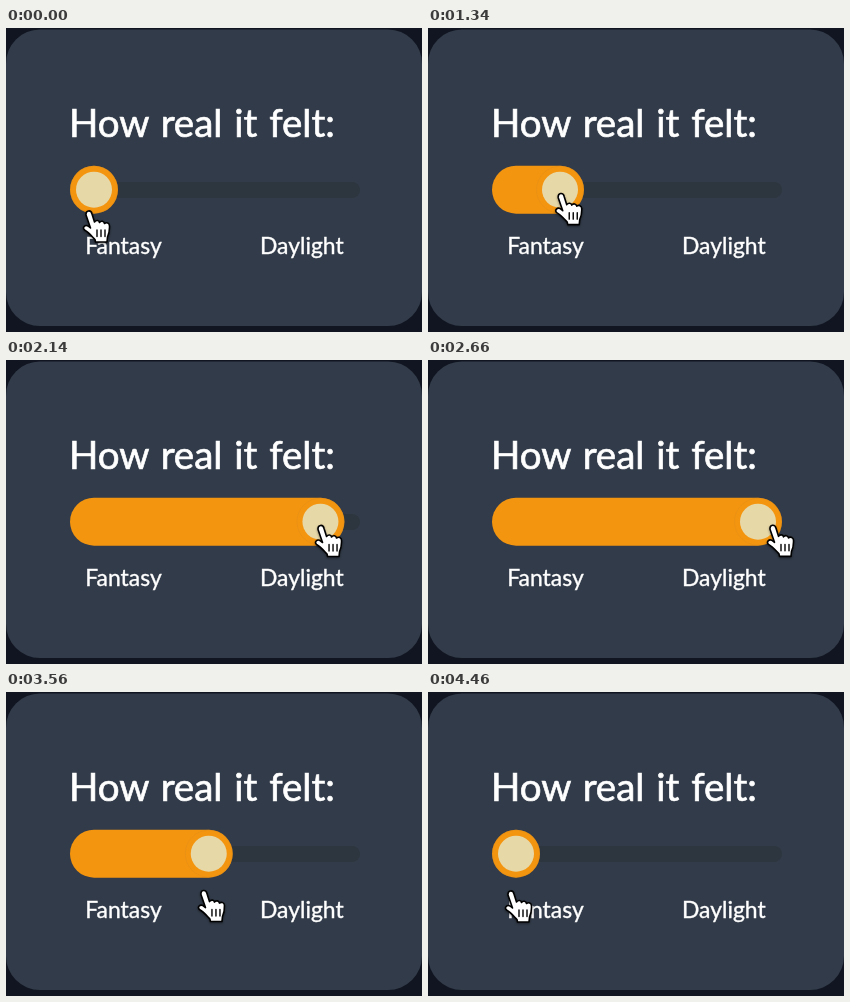
Write an HTML page that moves like this. It is 416x304 px and loops after 4480 ms.

```html
<!DOCTYPE html>
<html lang="en">
<head>
<meta charset="utf-8">
<title>Slider</title>
<style>
  html, body { margin: 0; width: 100%; height: 100%; overflow: hidden; background: #111521; }
  svg { display: block; width: 416px; height: 304px; }
  text { font-family: Lato, "Open Sans", sans-serif; fill: #fff; stroke: #fff; stroke-width: .4px; }
  .title { font-size: 38.5px; word-spacing: 2px; stroke-width: .7px; }
  .label { font-size: 22.9px; }
  .hand { filter: drop-shadow(0 1.5px 1px rgba(0, 0, 0, .4)); }
</style>
</head>
<body>
<svg viewBox="0 0 416 304">
  <rect y="1.5" width="416" height="296.5" rx="34" fill="#323b49"/>
  <text class="title" x="63" y="108.5">How real it felt:</text>
  <text class="label" x="79.3" y="226">Fantasy</text>
  <text class="label" x="254" y="226">Daylight</text>

  <rect x="64" y="154" width="290" height="16" rx="8" fill="#2d363f"/>
  <rect id="fill" x="64" y="137.7" width="48" height="48" rx="24" fill="#f4950f"/>
  <g id="thumb">
    <circle r="23.5" fill="none" stroke="#d98a1c" stroke-opacity=".45" stroke-width=".8"/>
    <circle r="18" fill="#e7d8a8"/>
  </g>

  <g id="hand" class="hand" stroke="#000" stroke-linejoin="round" stroke-linecap="round">
    <path fill="#fff" stroke-width="1.6" d="M-5 3C-5.5-2 0-2.5 1 2L3.5 10C5 8 8 8 8.5 10.5
      C10 8.5 13 9 13.5 11.5C15.5 10 18.5 11 18.5 14C18.7 19 18.5 21 16.5 25L16 30H4.5L4 27.5
      C1 24.5-2 20.5-6.5 18C-9 15.5-6 12.5-3 14L-.5 16Z"/>
    <path fill="none" stroke-width="1.4" d="M6 18v6.5m4 -6.5v6.5m4 -6.5v6.5"/>
  </g>
</svg>
<script>
  const LOOP = 4480, LAG = 16, MIN = 88, MAX = 330;
  const $ = id => document.getElementById(id);
  const fill = $('fill'), thumb = $('thumb'), hand = $('hand');

  const clamp = (v, lo, hi) => Math.min(hi, Math.max(lo, v));
  const span = (t, from, to) => clamp((t - from) / (to - from), 0, 1);
  const glide = (t, from, to) => (1 - Math.cos(Math.PI * span(t, from, to))) / 2;
  // Quick start, long soft stop
  const settle = (t, from, to) => 1 - (1 - span(t, from, to) ** 1.15) ** 1.45;

  // Reach the thumb, drag right, drag back
  const pointerX = t => 85 - 5 * glide(t, 100, 700)
    + 267 * glide(t, 842, 2502) - 262 * settle(t, 2720, 4460);
  const pointerY = t => 184 - 22 * glide(t, 100, 700)
    + 8 * glide(t, 900, 1700) - 5 * glide(t, 1700, 2400) + 35 * glide(t, 2520, 3640);

  function draw() {
    const t = performance.now() % LOOP;
    const x = clamp(pointerX(t - LAG), MIN, MAX);
    fill.setAttribute('width', x - 40);
    thumb.setAttribute('transform', `translate(${x} 161.7)`);
    hand.setAttribute('transform', `translate(${pointerX(t)} ${pointerY(t)})`);
    requestAnimationFrame(draw);
  }
  draw();
</script>
</body>
</html>
```
